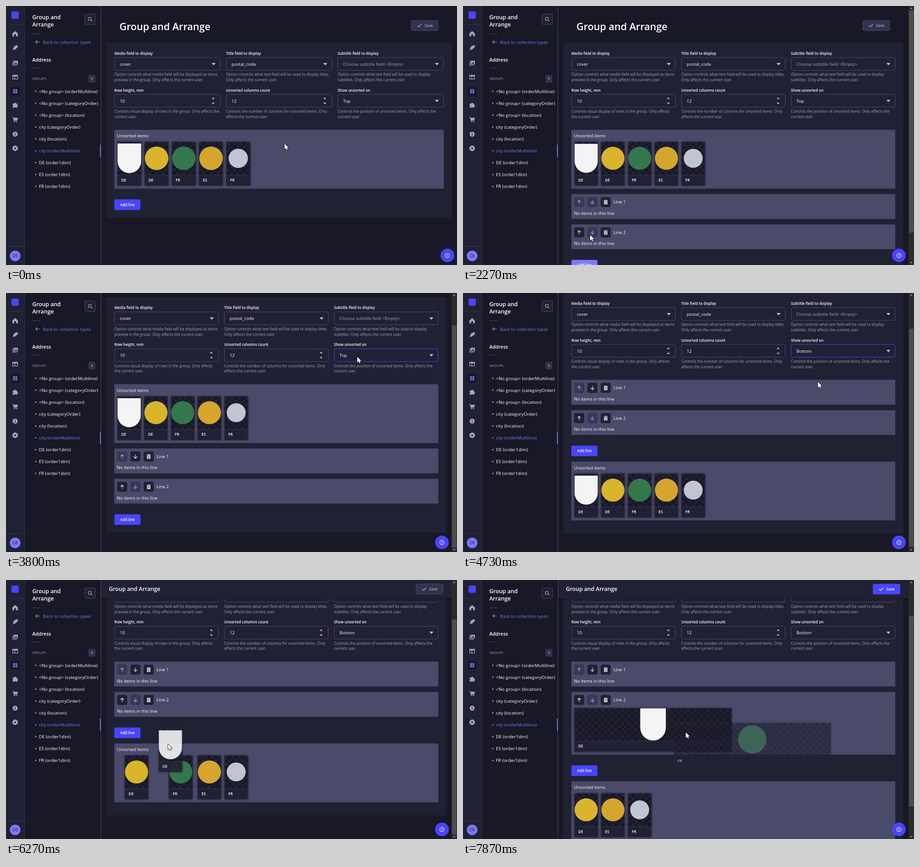
An HTML page with a canvas that plays this animation: 986 by 568 pixels, repeating every 8 s.

```html
<!DOCTYPE html>
<html lang="en">
<head>
<meta charset="utf-8">
<title>Group and Arrange</title>
<style>
html, body { margin: 0; width: 100%; height: 100%; overflow: hidden; background: #181826; }
canvas { display: block; }
</style>
</head>
<body>
<canvas id="stage" width="986" height="568"></canvas>
<script>
const stage = document.getElementById('stage').getContext('2d');
const layer = document.createElement('canvas').getContext('2d');
let ctx = stage;
const LOOP = 8000, VIEW = 568, LEFT = 237;
const BG = '#181826', PANEL = '#212134', EDGE = '#32324d', LINE = '#4a4a6a',
  GREY = '#a5a5ba', PALE = '#c0c0cf', PRIMARY = '#4945ff', LIGHT = '#7b79ff', WHITE = '#fff';

// time, x, y of the pointer tip
const PATH = [[0, 609, 302], [430, 609, 302], [1270, 270, 446], [1800, 270, 446], [2150, 276, 502],
  [2270, 278, 502], [2400, 278, 502], [2670, 500, 446], [3070, 660, 399], [3530, 738, 240],
  [3800, 768, 140], [3950, 768, 140], [4270, 776, 195], [4730, 776, 195], [5270, 420, 380],
  [5530, 420, 380], [5800, 264, 419], [5940, 264, 419], [6270, 354, 360], [6600, 387, 297],
  [7070, 387, 297], [7400, 328, 488], [7520, 328, 488], [7870, 487, 334], [8000, 487, 334]];

const ramp = (t, from, to) => {
  const u = Math.min(1, Math.max(0, (t - from) / (to - from)));
  return u * u * (3 - 2 * u);
};

function slope(i, k) {
  const a = PATH[i - 1], b = PATH[i], c = PATH[i + 1];
  if (!a || !c || (a[k] === b[k]) || (b[k] === c[k])) return 0;
  return (c[k] - a[k]) / (c[0] - a[0]);
}

function pointer(t) {
  let i = 0;
  while (i < PATH.length - 2 && PATH[i + 1][0] <= t) i++;
  const a = PATH[i], b = PATH[i + 1], d = b[0] - a[0], u = (t - a[0]) / d, v = 1 - u;
  return [1, 2].map(k => a[k] * (1 + 2 * u) * v * v + b[k] * u * u * (3 - 2 * u)
    + d * u * v * (slope(i, k) * v - slope(i + 1, k) * u));
}

function box(x, y, w, h, fill, r = 0, stroke) {
  ctx.beginPath();
  ctx.roundRect(x, y, w, h, r);
  if (fill) { ctx.fillStyle = fill; ctx.fill(); }
  if (stroke) { ctx.strokeStyle = stroke; ctx.lineWidth = 1; ctx.stroke(); }
}

function disc(x, y, r, fill) {
  ctx.beginPath();
  ctx.arc(x, y, r, 0, 7);
  ctx.fillStyle = fill;
  ctx.fill();
}

// y is the middle of the capital letters
function text(str, x, y, size = 9.6, color = WHITE, weight = 400, align = 'left') {
  ctx.font = `${weight} ${size}px "Open Sans", "Noto Sans", sans-serif`;
  ctx.textAlign = align;
  ctx.fillStyle = color;
  ctx.fillText(str, x, y + size * 0.36);
}

function icon(d, x, y, color, stroke) {
  const p = new Path2D(d);
  ctx.save();
  ctx.translate(x, y);
  ctx.fillStyle = ctx.strokeStyle = color;
  ctx.lineWidth = stroke || 1;
  ctx.lineCap = ctx.lineJoin = 'round';
  if (stroke) ctx.stroke(p); else ctx.fill(p, 'evenodd');
  ctx.restore();
}

const UP = 'M0 4V-4M-3.5 -.5L0 -4L3.5 -.5', DOWN = 'M0 -4V4M-3.5 .5L0 4L3.5 .5',
  CHECK = 'M-4 0L-1.2 3L4.5 -3', CARET = 'M-4.5 -2.3H4.5L0 2.7Z',
  TRASH = 'M-4.5 -4H-1.5V-5H1.5V-4H4.5V-2.8H-4.5ZM-3.7 -2H3.7V5H-3.7ZM-1.7 -.5V3.5H-.8V-.5ZM.8 -.5V3.5H1.7V-.5Z';

const NAV = [
  [61, 'M0 -6L6 -1V5.5H2V1H-2V5.5H-6V-1Z'],
  [92, 'M-6 6L-4 1C-4 -3 1 -6 6 -6C6 -2 5 0 3 1L1 1L2 2C0 4 -2 4 -4 3.5L-5.2 6Z'],
  [125, 'M-3.5 -5H6V3H-3.5ZM-2 1.5H5L2.3 -2L.5 0L-.6 -1ZM-6 -3H-4.8V4.3H4V5.5H-6Z'],
  [156, 'M-6 -5H6V5H-6ZM-4.7 -1.5V3.7H-1.2V-1.5ZM0 -1.5V3.7H4.7V-1.5Z'],
  [187, 'M-4.5 -4.5H-.6V-.6H-4.5ZM.6 -4.5H4.5V-.6H.6ZM-4.5 .6H-.6V4.5H-4.5ZM.6 .6H4.5V4.5H.6Z'],
  [217, 'M-5.5 -3H-2A2 2 0 1 1 2 -3H4.3V0A2 2 0 1 1 4.3 4V6H1.4A1.6 1.6 0 0 0 -1.6 6H-5.5V3A1.6 1.6 0 0 0 -5.5 0Z'],
  [249, 'M-6.5 -5.5H-4L-3.5 -4H6L4.5 2H-2L-1.7 3H4.5V4H-2.6L-4.8 -4.5H-6.5ZM-2.5 5A1 1 0 1 0 -.5 5A1 1 0 1 0 -2.5 5ZM2.5 5A1 1 0 1 0 4.5 5A1 1 0 1 0 2.5 5Z'],
  [281, 'M-5.5 0A5.5 5.5 0 1 0 5.5 0A5.5 5.5 0 1 0 -5.5 0ZM-.8 -3.3H.8V-1.8H-.8ZM-.8 -.8H.8V3.3H-.8Z'],
  [312, 'M-2 -6H2L2.6 -4.2L4.6 -4.4L6.3 -1L5 0L6.3 1.5L4.6 4.6L2.6 4.3L2 6H-2L-2.6 4.3L-4.6 4.6L-6.3 1.5L-5 0L-6.3 -1L-4.6 -4.4L-2.6 -4.2ZM-1.9 0A1.9 1.9 0 1 0 1.9 0A1.9 1.9 0 1 0 -1.9 0Z'],
];
const GROUPS = ['<No group> (orderMultiline)', '<No group> (categoryOrder)', '<No group> (location)',
  'city (categoryOrder)', 'city (location)', 'city (orderMultiline)', 'DE (order1dim)', 'ES (order1dim)', 'FR (order1dim)'];

function sidebar() {
  box(0, 0, 208, VIEW, BG);
  box(0, 0, 40, VIEW, PANEL);
  box(40, 0, 1, VIEW, EDGE);
  box(207, 0, 1, VIEW, LINE);
  box(0, 40, 40, 1, EDGE);
  box(0, 527, 40, 1, EDGE);
  box(12, 12, 16, 16, PRIMARY, 3);
  box(10, 177, 20, 20, BG, 3);
  NAV.forEach(([y, d]) => icon(d, 20, y, y === 187 ? LIGHT : GREY));
  disc(20, 548, 11.6, LIGHT);
  text('DB', 20, 548, 8.6, PANEL, 400, 'center');

  text('Group and', 57.5, 25, 12.2, WHITE, 600);
  text('Arrange', 57.5, 41, 12.2, WHITE, 600);
  box(172.5, 17.5, 23, 23, PANEL, 3, LINE);
  icon('M-4 -.8A3.3 3.3 0 1 0 2.6 -.8A3.3 3.3 0 1 0 -4 -.8M1.8 1.7L4.5 4.4', 184, 29, GREY, 1.2);
  box(58, 60.5, 17, 1, LINE);
  icon('M4.5 0H-4M-.8 -3.3L-4 0L-.8 3.3', 69, 79, GREY, 1.1);
  text('Back to collection types', 81, 80, 9.65, LIGHT);
  text('Address', 57.5, 118, 10.6, WHITE, 600);
  box(58, 135.5, 17, 1, LINE);
  text('GROUPS', 57.5, 159.5, 7.7, GREY);
  box(180, 151, 15.5, 17, EDGE, 3);
  text('9', 187.7, 159.5, 7.7, GREY, 600, 'center');
  GROUPS.forEach((name, i) => {
    const y = 187 + 26.1 * i, active = i === 5;
    disc(65, y, 1.5, active ? LIGHT : GREY);
    text(name, 72, y, 9.85, active ? LIGHT : WHITE, 500);
  });
  box(205.5, 304, 1.5, 27, LIGHT);
}

function saveButton(x, y, active) {
  box(x + .5, y + .5, 59, 22, active ? PRIMARY : EDGE, 3, active ? PRIMARY : LINE);
  const color = active ? WHITE : GREY;
  icon(CHECK, x + 18, y + 11.5, color, 1.3);
  text('Save', x + 29.5, y + 11.5, 8.1, color, 600);
}

function field(x, y, w, label, value, hints, { empty, stepper, focus } = {}) {
  text(label, x, y, 8.15, WHITE, 600);
  box(x + .5, y + 9, w - 1, 28, PANEL, 3, focus ? PRIMARY : LINE);
  text(value, x + 12, y + 23.3, 9.6, empty ? GREY : WHITE);
  if (stepper) {
    icon('M-3.2 1.5H3.2L0 -2Z', x + w - 16, y + 17.5, PALE);
    icon('M-3.2 -1.5H3.2L0 2Z', x + w - 16, y + 28.7, PALE);
  } else icon(CARET, x + w - 15, y + 23.2, PALE);
  hints.forEach((line, i) => text(line, x, y + 46.5 + 11.6 * i, 8.25, GREY));
}

// code, colour, picture width limit, height ratio
const ITEMS = [
  ['DE', '#f4f4f4', 56, 1.26],
  ['DE', '#d8b52c', 52, 1],
  ['FR', '#35774c', 62, 1],
  ['ES', '#d5a52d', 60, 1],
  ['FR', '#bfc6d2', 46, 1],
];

function card(id, x, y, w) {
  const [code, color, limit, ratio] = ITEMS[id];
  ctx.save();
  ctx.shadowColor = 'rgba(0,0,0,.35)';
  ctx.shadowBlur = 4;
  box(x, y, w, 97, PANEL, 3);
  ctx.shadowColor = 'transparent';
  ctx.save();
  box(x, y, w, 72.5, BG, [3, 3, 0, 0]);
  ctx.clip();
  ctx.fillStyle = PANEL;
  for (let row = 0; row < 11; row++)
    for (let col = row % 2; col * 7.2 < w; col += 2) ctx.fillRect(x + 1 + col * 7.2, y + 1 + row * 7.2, 7.2, 7.2);
  ctx.restore();
  box(x + .5, y + .5, w - 1, 96, null, 3, EDGE);
  box(x, y + 72.5, w, 1, EDGE);
  const size = Math.min(limit, (w - 2) * (id === 4 ? .82 : 1));
  if (id) disc(x + w / 2, y + 36.5, size / 2, color);
  else box(x + (w - size) / 2, y + 36.5 - size * ratio / 2, size, size * ratio, color, [1, 1, size / 2, size / 2]);
  text(code, x + 9, y + 84.5, 8.3, WHITE, 600);
  ctx.restore();
}

// The whole card fades as one picture
function fadedCard(id, x, y, w, alpha) {
  layer.canvas.width = w + 20;
  layer.canvas.height = 117;
  ctx = layer;
  card(id, 10, 10, w);
  ctx = stage;
  ctx.globalAlpha = alpha;
  ctx.drawImage(layer.canvas, x - 10, y - 10);
  ctx.globalAlpha = 1;
}

function unsorted(t, y, width) {
  box(LEFT, y, width, 129, LINE);
  text('Unsorted items', 242.5, y + 13.5);
  const step = (width - 6) / 12;
  const gone = t >= 6430 ? 1 : 0, rest = gone + ramp(t, 7660, 7800);
  const slots = [0, 1 - ramp(t, 6140, 6340), 2 - ramp(t, 6238, 6438), 3 - rest, 4 - rest];
  slots.forEach((slot, id) => {
    if (id === 0 && t >= 5940 || id === 2 && t >= 7520) return;
    card(id, 243 + slot * step, y + 26, step - 6);
  });
}

function lineButton(d, x, y, active, filled) {
  box(x + .5, y + .5, 21, 21, active ? PANEL : '#38385a', 3, active ? PANEL : EDGE);
  icon(d, x + 11, y + 11, active ? '#e4e4ee' : GREY, filled ? 0 : 1.2);
}

function lineRow(t, n, count, y, width, hasItem) {
  box(LEFT, y, width, hasItem ? 137.5 : 54.4, LINE);
  lineButton(UP, 243, y + 6.5, n > 1);
  lineButton(DOWN, 272, y + 6.5, n < count && t > 2330);
  lineButton(TRASH, 301, y + 6.5, true, true);
  text('Line ' + n, 329, y + 17.5);
  if (!hasItem) return text('No items in this line', 242.5, y + 42);
  const full = width - 12, half = (full - 6) / 2;
  fadedCard(0, 243, y + 34.7, full + (half - full) * ramp(t, 7660, 7800), .4 + .6 * ramp(t, 6430, 6700));
}

function page(t, scroll, count, width, bottom, dropped) {
  const right = LEFT + width, col = (width - 24) / 3, x2 = LEFT + col + 12, x3 = x2 + col + 12;
  const listTop = bottom ? 271.5 : 412.5, extra = dropped ? 83.1 : 0;
  const addTop = listTop + 66.4 * count + 11.5 + extra;
  const wide = !count;
  ctx.save();
  ctx.translate(0, -scroll);
  text('Group and Arrange', 248, 45, 21.6, WHITE, 600);
  saveButton(right - 71.5, 31.5, false);
  box(219.5, 81, right + 17.5 - 219.5, addTop + (bottom ? 193 : 40.5) - 81, PANEL, 3);

  field(LEFT, 104, col, 'Media field to display', 'cover',
    ['Option controls what media field will be displayed as items', 'preview in the group. Only affects the current user.']);
  field(x2, 104, col, 'Title field to display', 'postal_code',
    ['Option controls what text field will be used to display titles.', 'Only affects the current user.']);
  field(x3, 104, col, 'Subtitle field to display', 'Choose subtitle field <Empty>',
    ['Option controls what text field will be used to display', 'subtitles. Only affects the current user.'], { empty: true });
  field(LEFT, 184.8, col, 'Row height, rem', '10',
    ['Controls visual display of rows in the group. Only affects' + (wide ? ' the' : ''), (wide ? '' : 'the ') + 'current user.'], { stepper: true });
  field(x2, 184.8, col, 'Unsorted columns count', '12',
    ['Controls the number of columns for unsorted items. Only', 'affects the current user.'], { stepper: true });
  field(x3, 184.8, col, 'Show unsorted on', bottom ? 'Bottom' : 'Top',
    ['Controls the position of unsorted items. Only affects the', 'current user.'], { focus: t > 3800 && t < 5700 });

  for (let n = 1; n <= count; n++)
    lineRow(t, n, count, listTop + 66.4 * (n - 1), width, dropped && n === 2);
  const hover = t > 1170 && t < 1540 || t > 2130 && t < 2400;
  box(LEFT, addTop, 57, 23.3, hover ? LIGHT : PRIMARY, 3);
  text('Add line', 265.5, addTop + 11.7, 8.15, WHITE, 600, 'center');
  unsorted(t, bottom ? addTop + 35 : 271.5, width);
  ctx.restore();
}

function menu(y) {
  box(717.5, 154.5, 227, 65, PANEL, 3, LINE);
  box(721, y > 187 ? 187 : 158, 220, 29, BG, 3);
  text('Top', 729, 172.5, 9.6, LIGHT, 600);
  text('Bottom', 729, 201.5);
}

function scrollbar(scroll, height) {
  box(974, 0, 12, VIEW, '#2b2b2b');
  const k = 548 / height;
  box(975, 10 + scroll * k, 10, VIEW * k, '#4d4d4d');
  icon('M-3 1.5H3L0 -2Z', 980, 5, '#8a8a8a');
  icon('M-3 -1.5H3L0 2Z', 980, 563, '#8a8a8a');
}

function draw(t) {
  const count = t < 1540 ? 0 : t < 2230 ? 1 : 2;
  const bottom = t >= 4530, sticky = t >= 5100, dropped = t >= 6430;
  const menuOpen = t >= 3830 && !bottom, bar = count && !menuOpen;
  const width = count ? 708 : 720;
  const scroll = bottom ? 81 + 11.4 * ramp(t, 5000, 5200) : 71.5 * ramp(t, 2730, 2930);
  const height = dropped ? 743 : t >= 5330 ? 660 : bottom ? 651 : count === 2 ? 639.5 : 573.5;
  const [x, y] = pointer(t);

  box(0, 0, 986, VIEW, BG);
  page(t, scroll, count, width, bottom, dropped);
  if (sticky) {
    ctx.save();
    ctx.shadowColor = 'rgba(3,3,5,.35)';
    ctx.shadowBlur = 5;
    box(208, 0, 766, 40.5, PANEL);
    ctx.restore();
    text('Group and Arrange', 225, 20, 12.2, WHITE, 600);
    saveButton(896, 8.5, t >= 6500);
  }
  sidebar();
  if (menuOpen) menu(y);
  if (t >= 5940 && !dropped) fadedCard(0, x - 21, y - 35, 52.5, .9);
  if (t >= 7520) {
    const inside = ramp(t, 7660, 7720);
    fadedCard(2, x - 27, y - 21, 52.5 + 292.5 * inside, .9 - .3 * inside);
  }

  const help = bar ? 953 : 965;
  disc(help, 547, 15, PRIMARY);
  icon('M-4.6 0A4.6 4.6 0 1 0 4.6 0A4.6 4.6 0 1 0 -4.6 0', help, 547, WHITE, 1.1);
  text('?', help, 547, 7, WHITE, 700, 'center');
  if (bar) scrollbar(scroll, height);

  const arrow = 'M0 0V12.4L2.9 9.7L4.8 14L6.8 13.1L5 9H8.8Z';
  icon(arrow, x, y, '#000', 1.4);
  icon(arrow, x, y, WHITE);
}

const start = performance.now();
function frame() {
  draw((performance.now() - start) % LOOP);
  requestAnimationFrame(frame);
}
frame();
</script>
</body>
</html>
```
